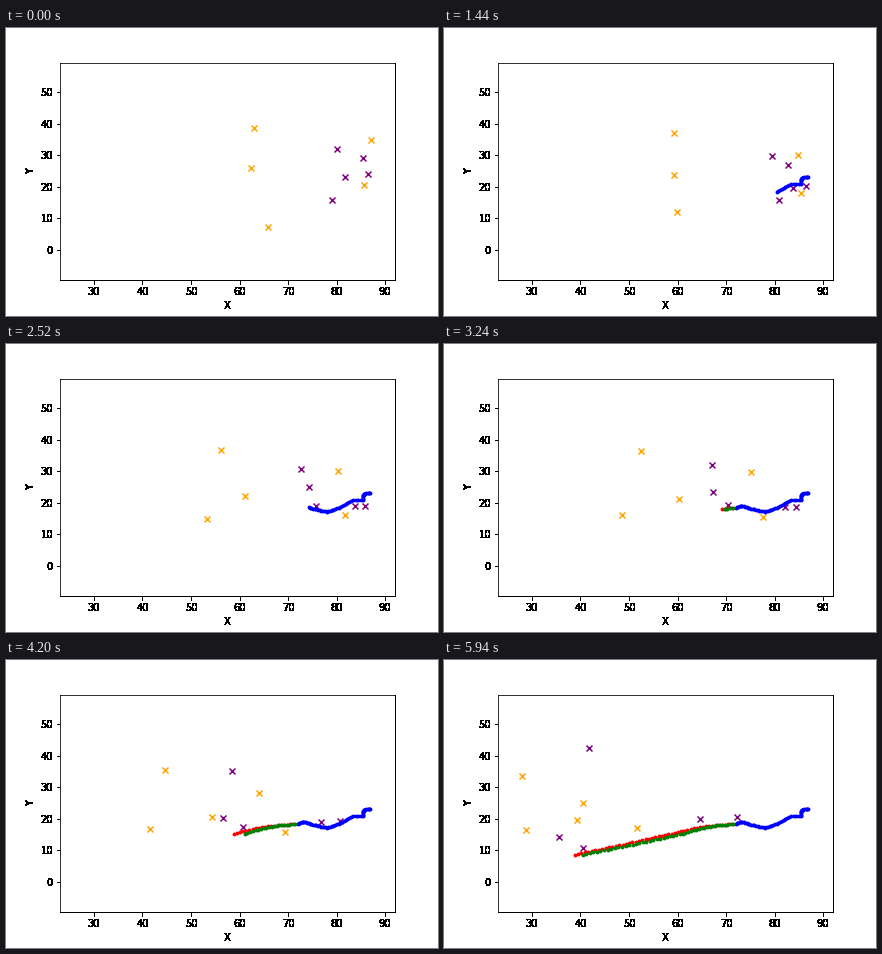
A matplotlib script that plays this animation: 432x288 px, repeating every 6 s.

```python
import numpy as np
import matplotlib.pyplot as plt
from matplotlib.animation import FuncAnimation
from matplotlib.transforms import Affine2D

W, H, DPI = 432, 288, 72
FRAMES, INTERVAL = 100, 60
SPLIT = 50  # observed steps before the forecast begins


def smooth(times, points, at):
    """Cubic Hermite curve through timed points, sampled at the given times."""
    t, p = np.asarray(times, float), np.asarray(points, float)
    v = np.gradient(p, t, axis=0)
    i = np.clip(np.searchsorted(t, at, "right") - 1, 0, len(t) - 2)
    h = (t[i + 1] - t[i])[:, None]
    u = (at - t[i])[:, None] / h
    return ((2 * u**3 - 3 * u**2 + 1) * p[i] + (u**3 - 2 * u**2 + u) * h * v[i]
            + (3 * u**2 - 2 * u**3) * p[i + 1] + (u**3 - u**2) * h * v[i + 1])


def run(*keys):
    """A player's path: start, two turning points and end."""
    return smooth((0, 24, 48, FRAMES - 1), keys, np.arange(FRAMES))


def trail(times, *keys):
    return smooth(times, keys, np.arange(times[0], times[-1] + 1))


# Paths in stage pixels
orange_runs = np.array([
    run((248, 100), (230, 105), (208, 107), (78, 116)),
    run((245, 140), (230, 147), (240, 154), (133, 160)),
    run((262, 199), (233, 184), (190, 173), (82, 170)),
    run((365, 112), (354, 127), (322, 128), (139, 143)),
    run((358, 157), (357, 165), (331, 173), (193, 168)),
])
purple_runs = np.array([
    run((331, 121), (328, 128), (282, 124), (145, 88)),
    run((357, 130), (344, 137), (287, 146), (115, 177)),
    run((362, 146), (362, 158), (357, 163), (293, 157)),
    run((339, 149), (349, 160), (347, 163), (256, 159)),
    run((326, 172), (335, 172), (298, 161), (139, 188)),
])
past = trail((0, 8, 11, 14, 23, 30, 37, 45, 49),
             (364, 149), (357, 152.5), (357, 156.5), (350, 156.5), (333, 164),
             (321, 168), (309, 165.5), (297.5, 162.5), (292, 164))
forecast = trail((50, 60, 69, 84, 98), (288, 164.5), (256.5, 167.8),
                 (228, 174), (179, 185), (131, 195))
truth = trail((50, 60, 69, 84, 98), (289, 164.5), (263.5, 167.5),
              (239, 174), (189, 185), (139, 195))

plt.rcParams.update({"font.family": "DejaVu Sans", "font.size": 10,
                     "path.simplify": False})
fig = plt.figure(figsize=(W / DPI, H / DPI), dpi=DPI, facecolor="white")
ax = fig.add_axes([0.125, 0.125, 0.775, 0.755])
ax.set(xlim=(23, 92), ylim=(-9.6, 59.4), xlabel="X", ylabel="Y",
       xticks=range(30, 91, 10), yticks=range(0, 51, 10))

# Lay solid black under every soft edge of the labels, ticks and frame
fig.canvas.draw()
shades = np.asarray(fig.canvas.buffer_rgba())[..., :3].min(axis=2)
fig.figimage(np.where(shades < 250, 0, 255), cmap="gray", vmin=0, vmax=255,
             zorder=-1)

screen = Affine2D().scale(1, -1).translate(0, H)
GAP = (np.nan, np.nan)
CROSS = np.array([(-3, -3), (3, 3), GAP, (-3, 3), (3, -3), GAP])
DOT = np.array([(-0.01, 0), (0.01, 0), GAP])


def stamp(points, shape):
    """Repeat a small stroke at the pixel centre of every point."""
    centres = np.floor(points) + 0.5
    return (centres[:, None] + shape).reshape(-1, 2).T


def pen(color, width, cap, z):
    return ax.plot([], [], color=color, lw=width, solid_capstyle=cap,
                   snap=False, zorder=z, transform=screen)[0]


crosses = [(pen("orange", 1.5, "butt", 3), orange_runs),
           (pen("purple", 1.5, "butt", 4), purple_runs)]
trails = [(pen("blue", 4, "round", 5), past, 0),
          (pen("red", 4, "round", 6), forecast, SPLIT),
          (pen("green", 4, "round", 7), truth, SPLIT)]


def update(n):
    for line, runs in crosses:
        line.set_data(*stamp(runs[:, n], CROSS))
    for line, steps, start in trails:
        line.set_data(*stamp(steps[:max(0, n - start)], DOT))
    return [item[0] for item in crosses + trails]


anim = FuncAnimation(fig, update, frames=FRAMES, interval=INTERVAL,
                     repeat=True, repeat_delay=0)
plt.show()
```
